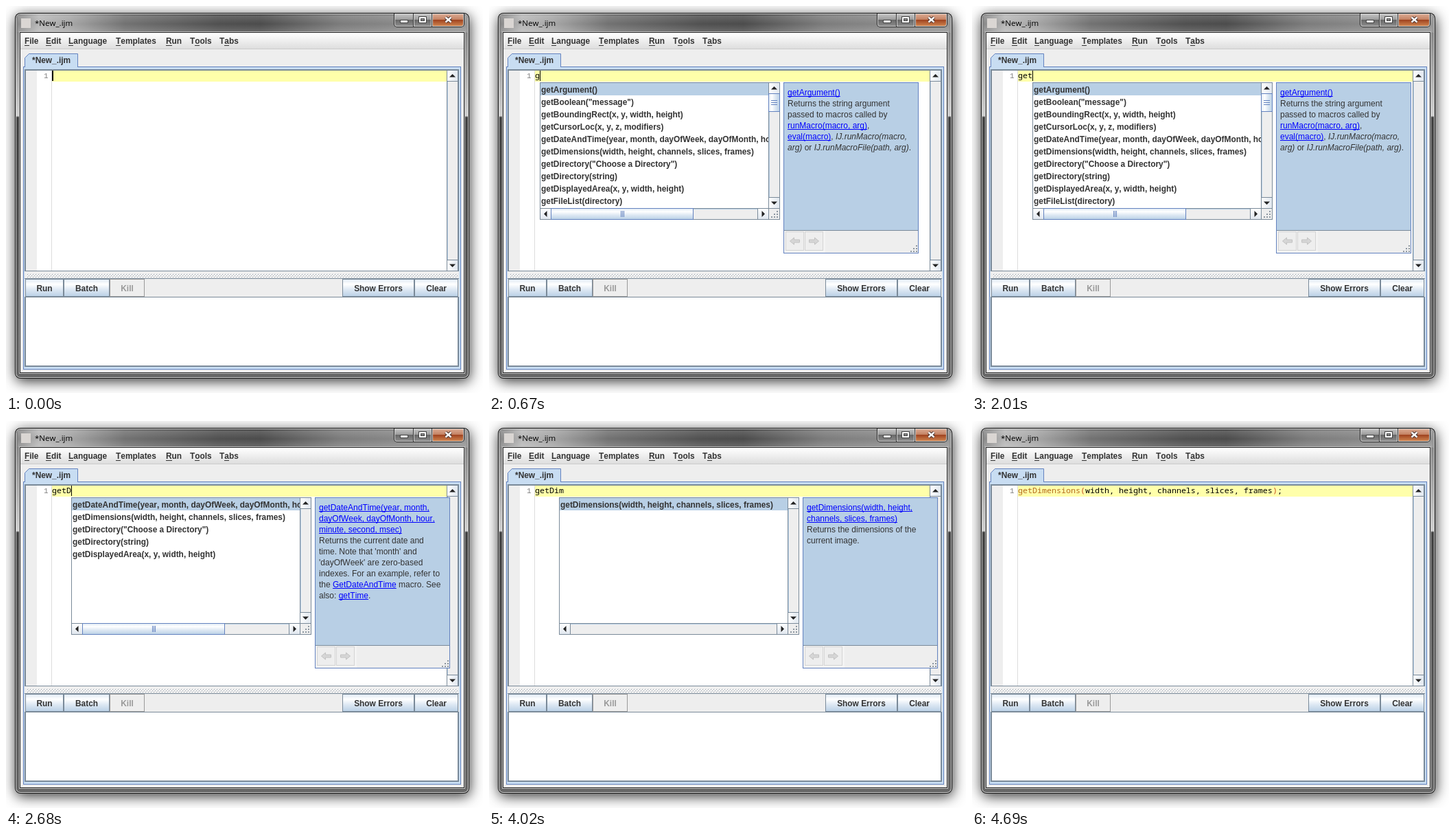
An HTML page with a canvas that plays this animation: 695x563 px, repeating every 6700 ms.

```html
<!DOCTYPE html>
<html lang="en">
<head>
<meta charset="utf-8">
<title>Code completion</title>
<style>
html, body { margin: 0; width: 100%; height: 100%; overflow: hidden; background: #fff; }
canvas { display: block; }
</style>
</head>
<body>
<canvas id="stage" width="695" height="563"></canvas>
<script>
const ctx = document.getElementById('stage').getContext('2d');
ctx.fontKerning = 'none';

const SANS = '"Liberation Sans", sans-serif';
const BOLD = 'bold 11.9px ' + SANS;
const PLAIN = '12px ' + SANS;
const ITALIC = 'italic 12px ' + SANS;
const MONO = '11.667px "Noto Sans Mono", monospace';
const EDGE = '#7a8a99', BLUE = '#6382bf', PALE = '#c8ddf2', PICK = '#b8cfe5', PANEL = '#eeeeee', INK = '#333333';

const STEP = 670, LOOP = 6700;
const CODE_X = 67, CHAR_W = 7;
const BAR = 17;
const WORD = 'getDim';

const items = [
  'getArgument()',
  'getBoolean("message")',
  'getBoundingRect(x, y, width, height)',
  'getCursorLoc(x, y, z, modifiers)',
  'getDateAndTime(year, month, dayOfWeek, dayOfMonth, hour, minute, second, msec)',
  'getDimensions(width, height, channels, slices, frames)',
  'getDirectory("Choose a Directory")',
  'getDirectory(string)',
  'getDisplayedArea(x, y, width, height)',
  'getFileList(directory)'
];

// [text] is a link, _text_ is italic
const docs = {
  [items[0]]: [
    '[getArgument()]',
    'Returns the string argument',
    'passed to macros called by',
    '[runMacro(macro, arg)],',
    '[eval(macro)], _IJ.runMacro(macro,_',
    '_arg)_ or _IJ.runMacroFile(path, arg)_.'
  ],
  [items[4]]: [
    '[getDateAndTime(year, month,]',
    '[dayOfWeek, dayOfMonth, hour,]',
    '[minute, second, msec)]',
    'Returns the current date and',
    "time. Note that 'month' and",
    "'dayOfWeek' are zero-based",
    'indexes. For an example, refer to',
    'the [GetDateAndTime] macro. See',
    'also: [getTime].'
  ],
  [items[5]]: [
    '[getDimensions(width, height,]',
    '[channels, slices, frames)]',
    'Returns the dimensions of the',
    'current image.'
  ]
};

function rect(x, y, w, h, fill) {
  ctx.fillStyle = fill;
  ctx.fillRect(x, y, w, h);
}

function box(x, y, w, h, fill, edge = EDGE) {
  rect(x, y, w, h, edge);
  rect(x + 1, y + 1, w - 2, h - 2, fill);
}

function text(str, x, y, font = BOLD, color = INK) {
  ctx.font = font;
  ctx.fillStyle = color;
  ctx.fillText(str, x, y);
  return ctx.measureText(str).width;
}

function path(points, fill, edge) {
  ctx.beginPath();
  points.forEach(([x, y]) => ctx.lineTo(x, y));
  if (fill) { ctx.closePath(); ctx.fillStyle = fill; ctx.fill(); }
  if (edge) { ctx.strokeStyle = edge; ctx.stroke(); }
}

function grad(x0, y0, x1, y1, stops) {
  const g = ctx.createLinearGradient(x0, y0, x1, y1);
  stops.forEach(([pos, color]) => g.addColorStop(pos, color));
  return g;
}

const ocean = (x0, y0, x1, y1) => grad(x0, y0, x1, y1,
  [[0, '#dde8f3'], [0.3, '#ffffff'], [0.6, '#dde8f3'], [1, '#b8cfe5']]);

function rounded(x, y, w, h, r, fill) {
  ctx.beginPath();
  ctx.roundRect(x, y, w, h, r);
  ctx.fillStyle = fill;
  ctx.fill();
}

function arrow(cx, cy, angle) {
  ctx.save();
  ctx.translate(cx, cy);
  ctx.rotate(angle);
  path([[-4.5, 2], [0, -2.5], [4.5, 2]], '#222');
  ctx.restore();
}

function vBar(x, y, h, thumb) {
  box(x, y, BAR, h, PANEL);
  rect(x + 1, y + 1, 1, h - 2, PICK);
  const face = grad(x, 0, x + BAR, 0, [[0, '#ffffff'], [1, '#dfe6ee']]);
  box(x, y, BAR, 17, face);
  box(x, y + h - 17, BAR, 17, face);
  arrow(x + 8.5, y + 8.5, 0);
  arrow(x + 8.5, y + h - 8.5, Math.PI);
  if (thumb) {
    box(x, y + 16, BAR, thumb, ocean(x, 0, x + BAR, 0), BLUE);
    for (let i = 0; i < 3; i++) rect(x + 4, Math.round(y + 12 + thumb / 2) + i * 3, 9, 1, BLUE);
  }
}

function hBar(x, y, w, thumb) {
  box(x, y, w, BAR, PANEL);
  rect(x + 1, y + 1, w - 2, 1, PICK);
  const face = grad(0, y, 0, y + BAR, [[0, '#ffffff'], [1, '#dfe6ee']]);
  box(x, y, 17, BAR, face);
  box(x + w - 17, y, 17, BAR, face);
  arrow(x + 8.5, y + 8.5, -Math.PI / 2);
  arrow(x + w - 8.5, y + 8.5, Math.PI / 2);
  if (thumb) {
    box(x + 16, y, thumb, BAR, ocean(0, y, 0, y + BAR), BLUE);
    for (let i = 0; i < 3; i++) rect(x + 14 + thumb / 2 + i * 2, y + 4, 1, 9, BLUE);
  }
}

function grip(right, bottom) {
  for (let row = 0; row < 3; row++)
    for (let col = 0; col <= row; col++)
      rect(right - 2 - col * 4, bottom - 10 + row * 4, 2, 2, '#8c96a0');
}

function button(label, x, w, off) {
  box(x, 397, w, 26, off ? PANEL : ocean(0, 397, 0, 423), off ? '#999999' : EDGE);
  ctx.textAlign = 'center';
  text(label, x + w / 2, 415, BOLD, off ? '#999999' : INK);
  ctx.textAlign = 'left';
}

function menu(label, x, key) {
  text(label, x, 55);
  const start = x + ctx.measureText(label.slice(0, key)).width;
  rect(Math.round(start), 57, Math.round(ctx.measureText(label[key]).width), 1, INK);
}

function drawFrame() {
  ctx.save();
  ctx.shadowColor = 'rgba(0,0,0,.8)';
  ctx.shadowBlur = 19;
  ctx.shadowOffsetX = 1;
  ctx.shadowOffsetY = 4;
  rounded(13, 10, 662, 532, 8, '#111');
  ctx.restore();
  rounded(14, 11, 660, 530, 7, '#d0d0d0');
  rounded(15, 12, 658, 528, 6, grad(0, 12, 0, 540, [
    [0, '#777'], [0.06, '#8c8c8c'], [0.28, '#d0d0d0'], [0.284, '#444'], [0.65, '#555'], [1, '#666']]));
  rounded(15, 12, 658, 27, [6, 6, 0, 0], grad(15, 0, 673, 0, [
    [0, '#858585'], [0.05, '#b8b8b8'], [0.12, '#a6a6a6'], [0.24, '#727272'],
    [0.45, '#505050'], [0.54, '#4c4c4c'], [0.72, '#7c7c7c'], [1, '#959595']]));
  rect(17, 14, 654, 24, grad(0, 14, 0, 38, [
    [0, 'rgba(255,255,255,.14)'], [0.5, 'rgba(255,255,255,0)'], [1, 'rgba(255,255,255,.16)']]));
  rect(19, 37, 650, 498, '#c4c4c4');
  rect(20, 38, 648, 496, '#222');
  rect(21, 39, 646, 494, PANEL);

  rect(22, 18, 14, 14, '#dad6d3');
  text('*New_.ijm', 42, 29, '11.5px "Open Sans", sans-serif', '#000');
  drawControls();
}

function drawControls() {
  const gray = grad(0, 12, 0, 29, [[0, '#c4c4c4'], [0.48, '#999'], [0.5, '#686868'], [1, '#8c8c8c']]);
  const red = grad(0, 12, 0, 29, [[0, '#dcab94'], [0.48, '#c27e5e'], [0.5, '#a04420'], [1, '#cf8450']]);
  rounded(565, 11, 103, 20, [0, 0, 5, 5], '#2c2c2c');
  rounded(566, 11, 101, 19, [0, 0, 4, 4], '#cccccc');
  rounded(567, 12, 26, 17, [0, 0, 0, 3], gray);
  rect(593, 11, 1, 19, '#3a3a3a');
  rect(595, 12, 24, 17, gray);
  rect(620, 11, 1, 19, '#3a3a3a');
  rounded(622, 12, 44, 17, [0, 0, 3, 0], red);

  box(574, 20, 12, 5, '#fff', '#444');
  box(601, 15, 12, 10, '#fff', '#444');
  box(604, 18, 6, 4, '#888', '#444');
  for (const [width, color] of [[4.5, '#4a3430'], [2.4, '#ffffff']]) {
    ctx.lineWidth = width;
    path([[640.5, 16.5], [648.5, 23.5]], null, color);
    path([[648.5, 16.5], [640.5, 23.5]], null, color);
  }
  ctx.lineWidth = 1;
}

function drawPanes() {
  rect(21, 39, 646, 23, grad(0, 39, 0, 62, [[0, '#ffffff'], [1, '#dedede']]));
  rect(21, 62, 646, 1, '#cccccc');
  menu('File', 27, 0);
  menu('Edit', 58, 0);
  menu('Language', 91, 0);
  menu('Templates', 160, 0);
  menu('Run', 233, 0);
  menu('Tools', 268, 1);
  menu('Tabs', 311, 1);

  const tab = [[27.5, 89], [27.5, 75.5], [33.5, 69.5], [104.5, 69.5], [104.5, 89]];
  box(25, 88, 638, 441, PALE, BLUE);
  path(tab, PALE);
  path(tab, null, BLUE);
  rect(28, 88, 76, 1, PALE);
  text('*New_.ijm', 38, 83);

  box(27, 92, 633, 294, EDGE);
  rect(29, 94, 629, 291, '#ffffff');
  rect(29, 94, 16, 291, PANEL);
  rect(66, 94, 1, 291, '#dddddd');
  rect(CODE_X, 94, 575, 16, '#ffffaa');
  text('1', 55, 105, '11px "Liberation Mono", monospace', '#808080');
  vBar(642, 93, 293);

  rect(27, 386, 633, 37, PANEL);
  for (let x = 30; x < 657; x += 4)
    for (const [dx, y] of [[0, 389], [2, 391], [0, 393]]) {
      rect(x + dx, y, 1, 1, '#ffffff');
      rect(x + dx + 1, y + 1, 1, 1, '#8f9aa6');
    }

  rect(27, 396, 633, 1, EDGE);
  button('Run', 28, 56);
  button('Batch', 84, 67);
  button('Kill', 151, 51, true);
  button('Show Errors', 490, 105);
  button('Clear', 595, 64);
  rect(27, 423, 633, 102, EDGE);
  rect(29, 424, 629, 99, '#ffffff');
}

function drawList(x, matches) {
  box(x, 111, 350, 200, '#ffffff');
  ctx.save();
  ctx.beginPath();
  ctx.rect(x + 1, 112, 332, 182);
  ctx.clip();
  rect(x + 1, 112, 332, 18, PICK);
  matches.forEach((item, i) => text(item, x + 2, 126 + i * 18));
  ctx.restore();
  vBar(x + 333, 111, 184, matches.length === items.length ? 27 : 0);
  hBar(x, 294, 334, matches.includes(items[4]) ? 208 : 0);
  rect(x + 334, 295, 15, 15, PANEL);
  grip(x + 347, 308);
}

function drawDoc(x, lines) {
  box(x, 111, 197, 249, PANEL, BLUE);
  rect(x + 1, 112, 195, 214, PICK);
  rect(x + 1, 326, 195, 1, EDGE);
  lines.forEach((line, i) => {
    let at = x + 6;
    const y = 130 + i * 16;
    for (const part of line.split(/(\[.*?\]|_.*?_)/)) {
      const inner = part.slice(1, -1);
      if (part[0] === '[') {
        const w = text(inner, at, y, PLAIN, '#0000ff');
        rect(at, y + 1, w, 1, '#0000ff');
        at += w;
      } else if (part[0] === '_') at += text(inner, at, y, ITALIC);
      else at += text(part, at, y, PLAIN);
    }
  });

  rect(x + 1, 327, 60, 32, '#f3f3f3');
  for (const [left, dir] of [[x + 3, -1], [x + 31, 1]]) {
    box(left, 328, 27, 28, PANEL, '#d4d4d4');
    const shape = [[7, 0], [1, -5], [1, -2], [-7, -2], [-7, 2], [1, 2], [1, 5]];
    path(shape.map(([px, py]) => [left + 13.5 + dir * px, 342 + py]), '#d6d6d6', '#c2c2c2');
  }
  grip(x + 195, 358);
}

function drawCall() {
  const [name, args] = items[5].split(/[()]/);
  const runs = [[name, '#b56a1c'], ['(', '#c8501e'], [args, '#000'], [')', '#c8501e'], [';', '#000']];
  let col = 0;
  for (const [str, color] of runs) {
    text(str, CODE_X + col * CHAR_W, 105, MONO, color);
    col += str.length;
  }
}

function draw(now) {
  const step = Math.floor(now % LOOP / STEP);
  rect(0, 0, 695, 563, '#ffffff');
  drawFrame();
  drawPanes();
  if (step > WORD.length) {
    drawCall();
  } else {
    const typed = WORD.slice(0, step);
    text(typed, CODE_X, 105, MONO, '#000');
    if (step < WORD.length) rect(CODE_X + step * CHAR_W, 94, step ? 1 : 2, 15, '#000');
    if (step) {
      const matches = items.filter(item => item.startsWith(typed));
      const x = CODE_X + CHAR_W * Math.min(step, 5);
      drawList(x, matches);
      drawDoc(x + 355, docs[matches[0]]);
    }
  }
}

const start = performance.now();
function tick() {
  draw(performance.now() - start);
  requestAnimationFrame(tick);
}
tick();
</script>
</body>
</html>
```
